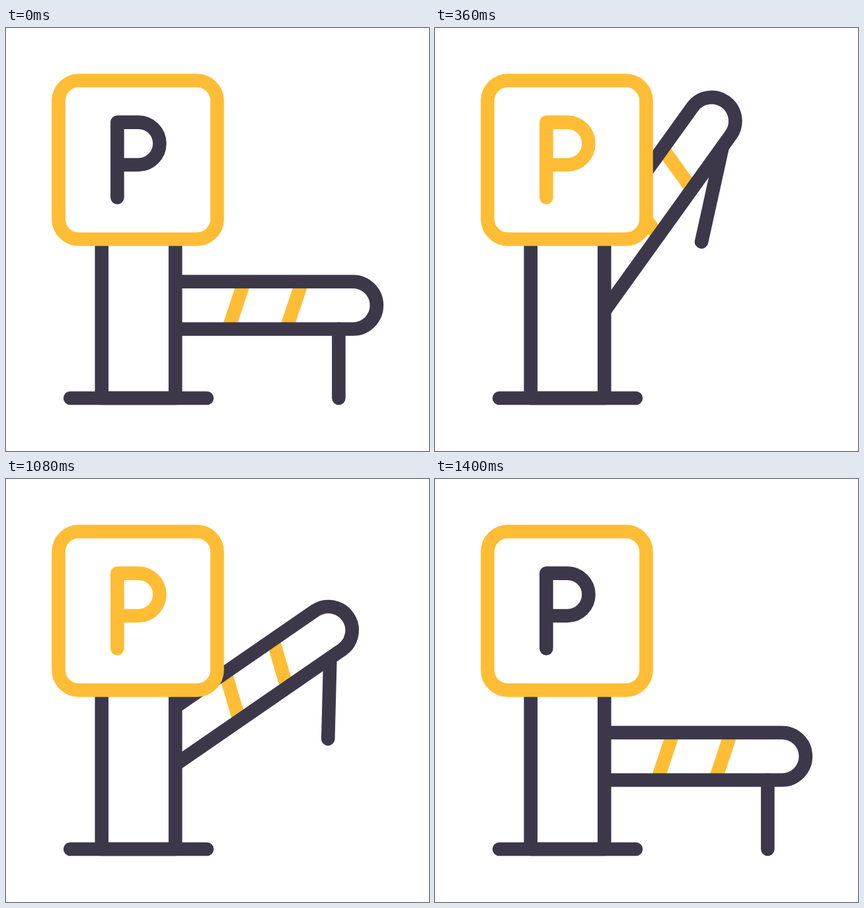
These frames come from a looping animation (640x640 px, 2000 ms). An HTML page:

```html
<!DOCTYPE html>
<html lang="en">
<head>
<meta charset="utf-8">
<title>Parking barrier</title>
<style>
  html, body { margin: 0; width: 100%; height: 100%; overflow: hidden; background: #fff; }
  svg { display: block; width: 100%; height: 100%; }
  path, rect, line { fill: none; stroke-width: 20.6; stroke-linejoin: round; }
  .dark { stroke: #3c384a; }
  .gold { stroke: #ffbd35; }
  .round { stroke-linecap: round; }
  .panel { fill: #fff; }
</style>
</head>
<body>
<svg viewBox="0 0 640 640">
  <g id="arm">
    <path class="gold" d="M359 388L337.7 452M446.5 388L425.2 452"/>
    <line id="leg" class="dark round" x1="503.4" y1="455.5"/>
    <path class="dark" d="M200 383.7H525a35.9 35.9 0 0 1 0 71.8H200"/>
  </g>
  <path class="dark panel" d="M144.8 320V560H256.3V320"/>
  <path class="dark round" d="M97.2 560H304"/>
  <rect class="gold panel" x="79.5" y="79.5" width="240" height="240" rx="30.5"/>
  <path id="letter" class="round" d="M168.4 256.5V142.6H200.3a32.2 32.2 0 0 1 0 64.4H168.4"/>
</svg>
<script>
  const LOOP = 2000, STEP = 40;
  const arm = document.getElementById('arm');
  const leg = document.getElementById('leg');
  const letter = document.getElementById('letter');

  // Each pose: arm angle, then the leg's foot in the arm's own coordinates.
  const closed = [0, 503.4, 560];
  const peak = [56.2, 359.5, 506.5];
  const open = [44.1, 411.5, 553];
  const moves = [
    { start: 80, end: 320, from: closed, to: peak },
    { start: 320, end: 480, from: peak, to: open },
    { start: 960, end: 1360, from: open, to: closed }
  ];

  const ease = u => u * u * (3 - 2 * u);

  function poseAt(t) {
    const move = moves.filter(m => t >= m.start).pop();
    if (!move) return closed;
    const k = ease(Math.min(1, (t - move.start) / (move.end - move.start)));
    return move.from.map((v, i) => v + (move.to[i] - v) * k);
  }

  function draw() {
    const t = Math.floor(performance.now() % LOOP / STEP) * STEP;
    const [angle, footX, footY] = poseAt(t);
    arm.setAttribute('transform', `rotate(${-angle} 200 384)`);
    leg.setAttribute('x2', footX);
    leg.setAttribute('y2', footY);
    letter.setAttribute('class', 'round ' + (t >= 120 && t < 1400 ? 'gold' : 'dark'));
    requestAnimationFrame(draw);
  }
  draw();
</script>
</body>
</html>
```
